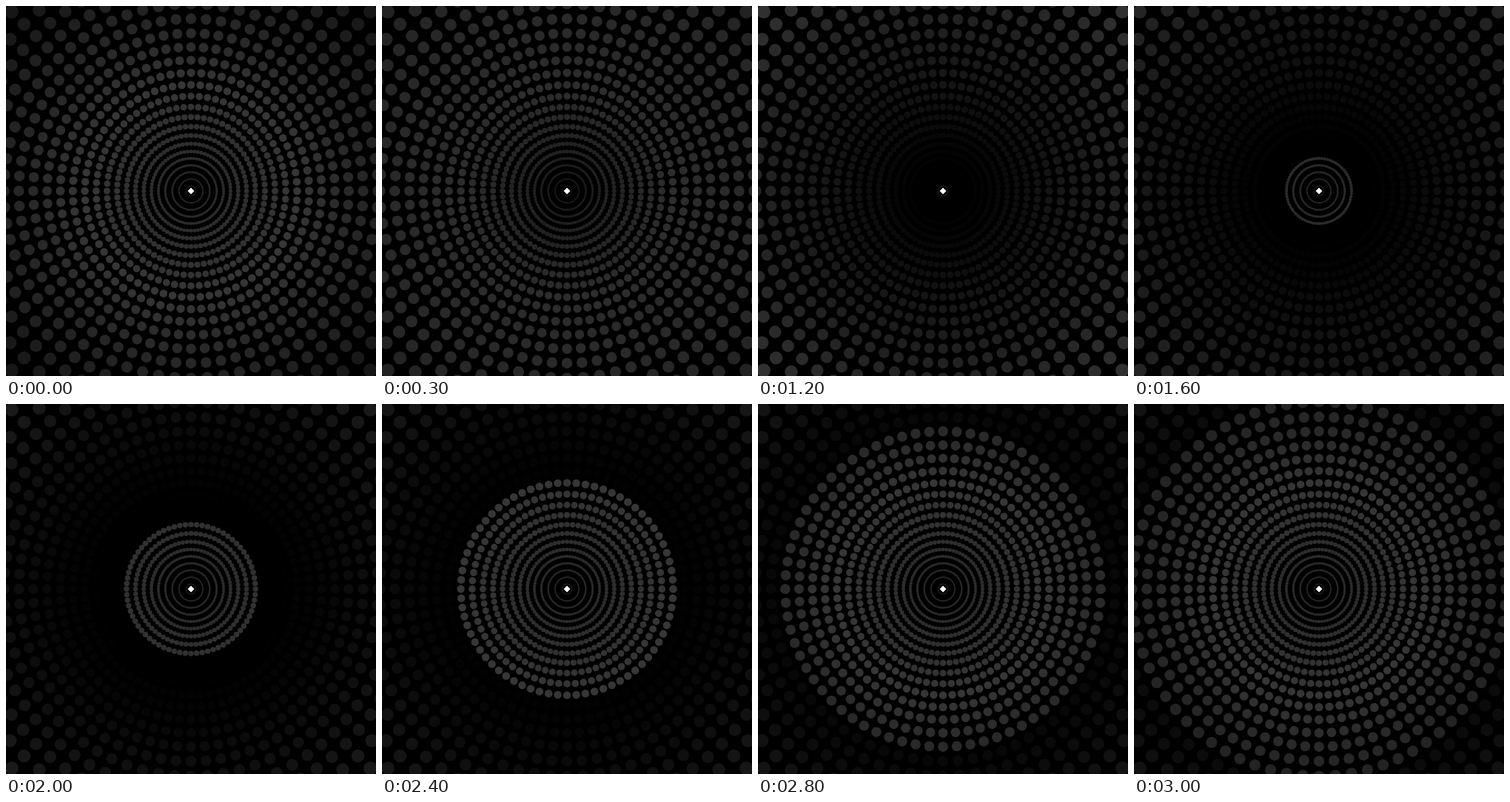
Write an HTML page with a canvas that moves like this. It is 500x500 px and loops after 3.2 s.

```html
<!DOCTYPE html>
<html>
<head>
<meta charset="utf-8">
<style>
html, body { margin: 0; height: 100%; overflow: hidden; background: #000; }
canvas { display: block; }
</style>
</head>
<body>
<canvas id="stage" width="500" height="500"></canvas>
<script>
const ctx = document.getElementById('stage').getContext('2d');
const LOOP = 3200, STEP = 100, DOTS = 72, FIRST = -4, LAST = 18;
const HOLDS = [0, 300, 400, 700, 800];

// Rings are evenly spaced near the centre and spread out from ring 0 on.
const radius = k => 44 + (k < 0 ? 9.3 * k : 9.11 * k + 0.4157 * k * k);
const dotSize = k => 2.15 + 0.39 * k;
const litAt = k => 1600 + STEP * k;
const litLevel = k => k < 8 ? 43 + 1.4 * k : 54 - 3.2 * (k - 8);
const fade = age => 54 * Math.min(1, Math.max(0, 1 - (age - 800) / 2200)) ** 1.25;

// The wave moves in hard steps, with longer rests early in the loop.
function stepped(t) {
  if (t < 1200) return HOLDS.filter(h => h <= t).pop();
  return Math.min(3000, Math.floor(t / STEP) * STEP);
}

function level(k, t) {
  if (t >= litAt(k)) return litLevel(k);
  const age = time => time + LOOP - litAt(k);
  if (t < 800) {
    const p = t / 800;
    return litLevel(k) * (1 - p) + fade(age(800)) * p;
  }
  return fade(age(t < 2000 ? t : 2000 + (t - 2000) * 0.3));
}

function ring(k, t) {
  const r = radius(k), size = dotSize(k);
  const v = Math.round(level(k, t));
  ctx.fillStyle = `rgb(${v},${v},${v})`;
  ctx.beginPath();
  for (let i = 0; i < DOTS; i++) {
    const a = i * 2 * Math.PI / DOTS;
    const x = 250 + r * Math.cos(a), y = 250 + r * Math.sin(a);
    ctx.moveTo(x + size, y);
    ctx.arc(x, y, size, 0, 2 * Math.PI);
  }
  ctx.fill();
}

function draw(now) {
  const t = stepped(now % LOOP);
  ctx.fillStyle = '#000';
  ctx.fillRect(0, 0, 500, 500);
  for (let k = FIRST; k <= LAST; k++) ring(k, t);
  ctx.fillStyle = '#fff';
  ctx.beginPath();
  ctx.moveTo(250, 245.5);
  ctx.lineTo(254.5, 250);
  ctx.lineTo(250, 254.5);
  ctx.lineTo(245.5, 250);
  ctx.fill();
  requestAnimationFrame(() => draw(performance.now()));
}
draw(0);
</script>
</body>
</html>
```
